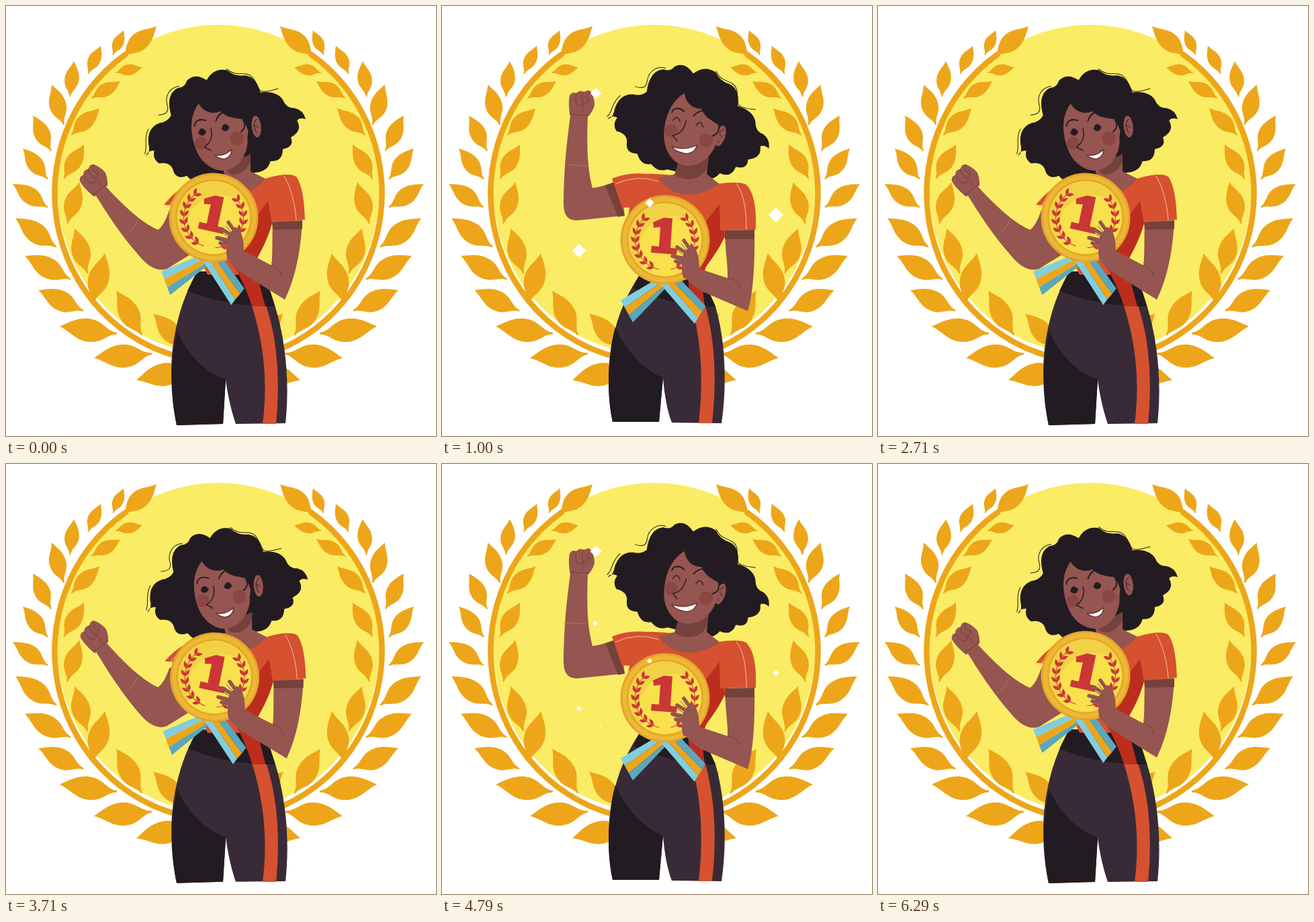
An HTML page that plays this animation: 640x640 px, repeating every 7210 ms.

```html
<!DOCTYPE html>
<html lang="en">
<head>
<meta charset="utf-8">
<title>Champion with medal</title>
<style>
html, body { margin: 0; width: 100%; height: 100%; overflow: hidden; background: #fff; }
svg { display: block; width: 100vw; height: 100vh; }
</style>
</head>
<body>
<svg viewBox="0 0 640 640">
  <g id="back"></g>
  <g id="figure"></g>
</svg>
<script>
const GOLD = '#eda61a', SKIN = '#955550', SHADE = '#75413b', INK = '#221c22', PANTS = '#382b37',
  RED = '#d6512f', DEEP = '#bd2d1e', MARK = '#cb3636';
const LOOP = 7210, FPS = 14, CYCLE = 50;

const fill = (d, color) => `<path d="${d}" fill="${color}"/>`;
const line = (d, color, width = 1) =>
  `<path d="${d}" fill="none" stroke="${color}" stroke-width="${width}" stroke-linecap="round" stroke-linejoin="round"/>`;
const group = (transform, ...parts) => `<g transform="${transform}">${parts.join('')}</g>`;
const disc = (x, y, r, color) => `<circle cx="${x}" cy="${y}" r="${r}" fill="${color}"/>`;

// Blend the numbers of two paths; an optional middle path bends the way between them.
const NUM = /-?\d+(\.\d+)?/g;
function mix(a, b, p, mid) {
  const to = b.match(NUM), via = mid && mid.match(NUM);
  let i = 0;
  return a.replace(NUM, s => {
    const v = +s, w = +to[i], bend = via ? 4 * (via[i] - (v + w) / 2) * p * (1 - p) : 0;
    i++;
    return (v + (w - v) * p + bend).toFixed(2);
  });
}

function leaf(x0, y0, x1, y1, color = GOLD) {
  const len = Math.hypot(x1 - x0, y1 - y0), turn = Math.atan2(y1 - y0, x1 - x0) * 180 / Math.PI;
  return group(`translate(${x0} ${y0}) rotate(${turn}) scale(${len})`,
    fill('M0 -.01C.16 -.02 .22 -.19 .46 -.2C.7 -.21 .8 -.06 1 0C.86 .08 .72 .2 .5 .2C.26 .2 .2 .03 0 .02Z', color));
}

function background() {
  const outer = [
    [174, 75, 224, 30], [159, 73, 175, 36], [122, 101, 141, 59], [95, 135, 101, 82], [86, 177, 68, 117],
    [67, 216, 40, 163], [62, 258, 25, 212], [62, 300, 10, 265], [75, 359, 14, 316], [96, 407, 28, 372],
    [115, 454, 48, 423], [165, 488, 80, 477], [217, 518, 131, 524], [277, 540, 194, 557]];
  const inner = [
    [163, 99, 203, 91], [127, 137, 170, 112], [97, 192, 139, 152], [86, 257, 116, 206], [91, 324, 109, 262],
    [121, 398, 102, 331], [129, 443, 147, 368], [202, 490, 164, 424], [268, 510, 219, 458]];
  const branch = line('M178 72A244.5 251 0 0 0 290 528', GOLD, 8.5) +
    [...outer, ...inner].map(l => leaf(...l)).join('');
  return `<ellipse cx="316" cy="273.5" rx="239.5" ry="245.5" fill="#fbec65"/>` +
    branch + group('translate(632) scale(-1 1)', branch);
}

function legs(p) {
  return fill(mix(
    'M285 395 C264 430 246 485 246 545 C246 580 250 605 254 624 L323 622 L327 556 C330 580 336 605 342 622 L416 621 C421 575 420 510 400 445 L384 395 Z',
    'M293 402 C268 440 248 490 248 560 C248 585 251 605 254 619 L323 619 L329 553 C331 580 336 605 342 620 L416 621 C423 575 424 505 407 447 L388 405 Z', p), PANTS) +
  fill(mix(
    'M255 484 C246 520 243 570 254 624 L323 622 L327 556 C297 545 270 520 255 484 Z',
    'M258 478 C246 520 245 580 254 619 L323 619 L329 553 C302 542 274 515 258 478 Z', p), INK) +
  fill(mix(
    'M364 440 C384 500 390 560 382 622 L402 622 C408 560 405 495 385 440 Z',
    'M370 440 C387 500 389 560 382 621 L402 621 C409 560 407 495 390 440 Z', p), RED) +
  fill(mix(
    'M285 395 L384 395 L400 447 C355 448 310 440 270 424 Z',
    'M293 402 L388 405 L407 447 C370 448 330 440 285 420 Z', p), INK);
}

function raisedArm(p) {
  const wrist = mix('140 274', '204 163', p, '169 214');
  return fill(mix(
    'M133 281 C150 308 170 340 200 374 C212 388 226 396 240 391 L290 360 L262 296 L243 304 C238 318 233 329 226 333 C200 322 170 292 148 268 Z',
    'M191 163 C187 195 182 230 181 285 C180 308 184 320 203 319 L272 312 L265 262 L245 266 C238 268 232 270 224 271 C217 245 215 215 217 163 Z', p,
    'M157 217 C163 250 172 285 186 330 C192 350 202 365 215 361 L270 338 L270 285 L247 290 C238 297 232 302 224 306 C210 285 194 250 181 210 Z'), SKIN) +
  fill(mix('M243 306 L250 300 L262 330 L250 345 Z', 'M243 267 L256 262 L272 312 L262 314 Z', p,
    'M240 294 L254 284 L275 330 L258 342 Z'), SHADE) +
  line(mix('M176 343 Q188 335 196 319', 'M182 237 Q200 236 217 238', p, 'M174 288 Q190 284 203 277'), '#c07a5e', .8) +
  group(`translate(${wrist}) rotate(${mix('-41', '0', p, '-20')})`,
    fill('M-13 2C-15 -8 -16 -20 -14 -30Q-10 -36 -4 -33Q0 -39 8 -35Q14 -40 18 -35Q23 -26 23 -15Q20 -5 13 2Z', SKIN),
    line('M-13 -2Q0 1 14 -1M-4 -33Q-7 -24 -3 -16M8 -35Q2 -30 6 -18M-3 -16Q3 -12 6 -18Q14 -17 16 -24M16 -34Q10 -30 13 -21M6 -16Q10 -10 4 -5', SHADE));
}

function torso(p) {
  return fill(mix(
    'M265 268 C300 250 360 245 386 257 C405 252 420 250 430 253 L396 323 C390 345 382 360 374 375 L372 400 L300 400 L262 320 Z',
    'M290 250 C330 248 380 255 413 265 C428 262 440 262 450 265 L421 343 C412 362 402 375 393 388 L386 408 L300 405 L275 320 Z', p), RED) +
  fill(mix(
    'M390 290 L396 323 C390 345 382 360 374 375 L372 395 L386 447 L366 447 C360 425 345 395 330 370 Z',
    'M413 295 L421 343 C412 362 402 375 393 388 L386 405 L391 447 L372 447 C369 425 362 405 370 350 Z', p), DEEP) +
  fill(mix(
    'M235 296 C245 283 255 275 265 268 L300 262 L300 300 L247 308 Z',
    'M253 257 C275 248 300 246 325 256 L345 300 L268 300 Z', p), RED) +
  line(mix('M240 300 Q255 278 290 266', 'M258 265 Q290 250 322 261', p), '#f3bfa5') +
  fill(mix(
    'M296 258 L325 253 L322 235 L364 222 L364 246 L386 257 C358 290 316 285 296 258 Z',
    'M322 256 L347 250 L352 232 L397 222 L394 250 L413 265 C385 285 345 290 322 256 Z', p), SKIN) +
  fill(mix(
    'M328 240 L364 220 L364 232 C355 250 340 254 330 248 Z',
    'M352 232 L397 222 L394 242 C384 260 362 262 346 251 Z', p), SHADE) +
  fill(mix(
    'M384 258 C405 250 425 249 432 254 C442 268 444 295 445 318 L396 323 C393 305 391 295 390 290 Z',
    'M411 265 C430 262 445 262 453 266 C466 280 468 305 467 333 L414 334 C414 315 413 305 413 295 Z', p), RED) +
  line(mix('M414 253 C425 272 430 295 432 318', 'M438 264 C450 280 453 305 453 333', p), '#f3bfa5');
}

const headPose = p =>
  `translate(${327 + 39.5 * p} ${195 - 5.5 * p + 15 * p * (1 - p)}) rotate(${-14 + 23.3 * p}) translate(-352 -195)`;

function hair(p) {
  return group(headPose(p),
    fill('M230 194Q238 190 238 178Q241 153 262 151Q274 152 281 144Q280 112 300 107Q311 109 316 100Q330 90 345 106' +
      'Q360 90 378 99Q386 111 402 113Q418 119 418 143Q442 146 448 162Q450 176 462 178Q474 184 474 198' +
      'Q466 193 461 197Q466 214 446 219Q448 234 430 233Q426 251 408 246Q400 260 383 257L330 253' +
      'Q316 260 305 249Q290 254 282 237Q264 240 264 222Q262 210 246 209Q238 200 244 189Q234 186 230 194Z', INK),
    line('M263 139C274 141 280 138 279 127C279 112 291 103 303 105M378 97C386 109 395 108 404 111C418 117 413 132 419 141' +
      'Q424 145 445 144M229 190C236 182 232 168 243 156', INK));
}

function eye(x, y, p) {
  return group(`translate(${x} ${y})`, `<path d="M-5.5 2Q0 -9 5.5 2Q0 ${10 - 19 * p} -5.5 2Z"
    fill="${INK}" stroke="${INK}" stroke-width="1.2" stroke-linejoin="round"/>`);
}

function face(p) {
  const mouth = mix(
    'M337 217 C345 221 355 220 363 215 C362 223 354 227 348 226 C343 224 339 221 337 217 Z',
    'M326 218 C338 221 352 218 363 210 C362 222 352 227 342 225 C334 224 329 222 326 218 Z', p);
  return group(headPose(p),
    `<ellipse cx="400" cy="191" rx="7" ry="16" transform="rotate(8 400 191)" fill="${SKIN}"/>`,
    line('M399 201C394 194 398 179 404 181M397 190Q401 188 402 193', INK, .9),
    group(`translate(${12 * (p - .6)})`,
      fill('M332 137C318 149 312 165 311 185C310 208 316 225 330 236C342 246 358 245 371 236C383 227 389 214 390 205' +
        'L394 194L391 176C381 171 367 168 361 156C346 158 336 150 332 137Z', SKIN),
      disc(321, 195, 9.5, '#8a4642'), disc(375, 201, 10, '#8a4642'),
      line('M390 176Q394 188 383 193', INK, 1.8),
      line('M318 168C320 160 329 159 336 164M351 168C356 160 363 157 371 158', INK, 1.8),
      eye(327, 178, p), eye(362, 180, p),
      line('M341 177C341 191 335 198 325 202L333 209', INK, 1.4),
      `<path d="${mouth}" fill="#fff" stroke="#713638" stroke-width="1.6" stroke-linejoin="round"/>`));
}

function wreathHalf() {
  let out = line('M-30 -33A45 45 0 0 0 -9 44', MARK);
  for (let i = 0; i < 8; i++) {
    const a = (112 + i * 15.5) * Math.PI / 180, x = 44 * Math.cos(a), y = 44 * Math.sin(a);
    for (const side of [-.55, .55]) {
      const dir = a + Math.PI / 2 + side;
      out += leaf(x, y, x + 12 * Math.cos(dir), y + 12 * Math.sin(dir), MARK);
    }
  }
  return out;
}
const wreath = wreathHalf();

// Each stripe fills the space between two neighbouring edges.
const ribbon = (edges, colors) => colors.map((color, i) =>
  fill(`M${edges[i]}L${edges[i + 1].split(' ').reverse().join(' ')}Z`, color)).join('');

function medal(p) {
  return group(`translate(${309 + 23 * p} ${315 + 33 * p}) rotate(${8 * (1 - p)})`,
    ribbon(['-66,90 -12,58', '-60,101 -4,62', '-54,112 4,64', '-48,123 16,56'], ['#82cede', GOLD, '#5ba7bb']),
    ribbon(['44,125 -12,60', '49,116 0,60', '55,107 10,60', '60,98 20,56'], ['#82cede', GOLD, '#5ba7bb']),
    disc(0, 0, 66.5, '#e3a529'), disc(0, 0, 63.5, '#edb738'), disc(0, 0, 57, '#e5a71f'), disc(0, 0, 54.5, '#f1d247'),
    fill('M-34 42A54 54 0 0 0 48 -24A54 54 0 0 0 -34 42Z', '#f8e14c'),
    wreath, group('scale(-1 1)', wreath),
    fill('M-18 -26L-2 -33L11 -32L8 12L18 13L17 22L-21 19L-20 9L-9 10L-7 -19L-17 -18Z', MARK));
}

function frontArm(p) {
  return fill(mix(
    'M328 375 C335 385 345 394 352 398 L415 437 C428 410 438 375 441 320 L397 322 C396 355 397 372 395 386 L353 364 Z',
    'M358 398 C366 410 376 418 385 424 L455 454 C463 430 466 385 465 334 L421 335 C422 370 426 390 425 405 L383 391 Z', p), SKIN) +
  fill(mix('M396 322 L441 319 L441 332 L397 333 Z', 'M421 334 L465 333 L465 347 L421 347 Z', p), SHADE) +
  line(mix('M395 386 Q408 388 410 402', 'M425 405 Q440 406 444 419', p), SHADE) +
  group(`translate(${29 * p} ${27 * p})`,
    line('M344 340L331 322M340 344L321 332M336 350L314 345M336 356L319 353', SKIN, 5.5),
    fill('M341 329C350 331 354 345 354 366L352 380L331 378C326 370 329 362 328 352C329 342 335 336 341 329Z', SKIN),
    line('M327 327L339 341M320 336L334 346M316 348L330 352', SHADE, .9));
}

// Each sparkle: place and the step at which it is largest.
const SPARKS = [[497, 311, 13.8], [204, 364, 13.4], [229, 130, 15.6], [228, 237, 20.6], [236, 390, 21.8], [475, 239, 29.5]];
const glow = (c, peak) => Math.max(0, 11.5 - 2.1 * Math.abs(c - peak));
const diamond = (x, y, s) => s ? fill(`M${x - s} ${y}L${x} ${y - s}L${x + s} ${y}L${x} ${y + s}Z`, '#fff') : '';

function sparkles(c, p) {
  const shine = .65 * Math.max(glow(c, 14.5), glow(c, 29.5));
  return SPARKS.map(([x, y, peak]) => diamond(x, y, glow(c, peak))).join('') +
    diamond(271 + 38 * p, 262 + 31 * p, shine);
}

const ease = x => (1 - Math.cos(Math.PI * Math.min(1, Math.max(0, x)))) / 2;
const sway = (c, upFrom, upTo, downFrom, downTo) =>
  ease((c - upFrom) / (upTo - upFrom)) - ease((c - downFrom) / (downTo - downFrom));

const figure = document.getElementById('figure');
document.getElementById('back').innerHTML = background();
let shown = -1;

function draw() {
  const step = Math.floor(performance.now() % LOOP * FPS / 1000 + .07);
  if (step !== shown) {
    shown = step;
    const c = step % CYCLE, p = sway(c, 0, 12, 24, 37), q = sway(c, 1, 13, 25, 36);
    figure.innerHTML = raisedArm(q) + hair(p) + legs(p) + torso(p) + face(p) + medal(p) + frontArm(p) + sparkles(c, p);
  }
  requestAnimationFrame(draw);
}
draw();
</script>
</body>
</html>
```
